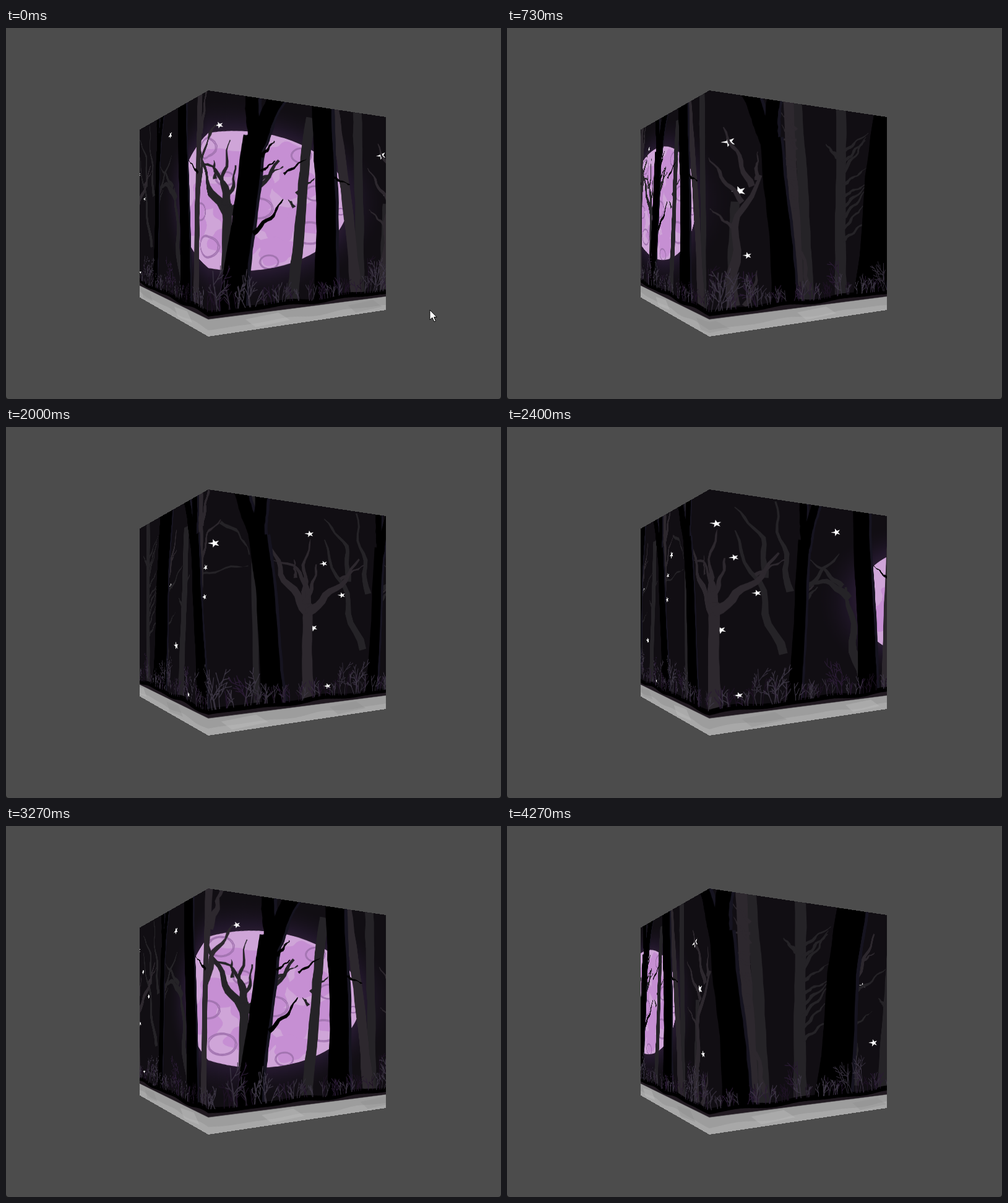
Recreate the animation shown at these times as an HTML page with a canvas. Size 800x600 px, loop 4340 ms.

```html
<!DOCTYPE html>
<html lang="en">
<head>
<meta charset="utf-8">
<title>Night forest cube</title>
<style>
html, body { margin: 0; width: 100%; height: 100%; overflow: hidden; background: #4c4c4c; }
canvas { display: block; }
</style>
</head>
<body>
<canvas id="stage" width="800" height="600"></canvas>
<script>
const LOOP = 4340, STEP = 200 / 3, LAST = 64, TURN = 0.08;
const S = 480, WIDE = 4 * S;              // texture: four square faces side by side
const EDGE_X = 327, EDGE_TOP = 101;
const LEFT = { far: 216, top: 164.5, ratio: 398 / 271, dir: -1 };
const RIGHT = { far: 614, top: 144, ratio: 398 / 312, dir: 1 };

const GREY = '#252327', MAUVE = '#2d282e', RIM = '#161420', BLACK = '#000';
const ORDER = [GREY, MAUVE, RIM, BLACK];
const MOON = { x: 0.208 * S, y: 0.447 * S, rx: 0.535 * S, ry: 0.298 * S };

let seed = 7;
const rand = () => (seed = (seed * 16807) % 2147483647) / 2147483647;
const spread = n => (rand() - 0.5) * n;
const lerp = (a, b, t) => a + (b - a) * t;

// Perspective of one screen column on a face
function column(x, face) {
  const s = (x - EDGE_X) / (face.far - EDGE_X);
  const top = lerp(EDGE_TOP, face.top, s);
  return { u: face.dir * s / (s + (1 - s) * face.ratio), top, h: 600 - 2 * top };
}

// Scenery is placed as it appears on the right face at the current view
let view = 0;
function spot(x, y) {
  const c = column(x, RIGHT);
  return [(view + c.u) * S, (y - c.top) / c.h * S];
}
function outline(points) {
  const path = new Path2D();
  points.forEach(p => path.lineTo(...spot(...p)));
  path.closePath();
  return path;
}

const wood = Object.fromEntries(ORDER.map(c => [c, []]));
const stars = [], craters = [], patches = [];

// Outline of a line whose points are [x, y, width], with rough bark
function limb(color, line) {
  const sideA = [], sideB = [];
  line.forEach(([x, y, w], i) => {
    const p = line[Math.max(0, i - 1)], q = line[Math.min(line.length - 1, i + 1)];
    const dx = q[0] - p[0], dy = q[1] - p[1], d = Math.hypot(dx, dy);
    const a = w / 2 + spread(1.5), b = w / 2 + spread(1.5);
    sideA.push([x - dy / d * a, y + dx / d * a]);
    sideB.unshift([x + dy / d * b, y - dx / d * b]);
  });
  wood[color].push(outline([...sideA, ...sideB]));
}
function dark(line) {
  limb(RIM, line.map(([x, y, w]) => [x + 5, y, w]));
  limb(BLACK, line);
}

// A stem from the upper edge to the ground, flaring at the foot
function stem(head, foot, w, from = 0, to = 1) {
  const line = [], phase = rand() * 6;
  for (let i = 0; i <= 14; i++) {
    const t = i / 14, v = lerp(from, to, t);
    const x = lerp(head, foot, t ** 0.85) + Math.sin(t * 8 + phase) * w * 0.04;
    const c = column(x, RIGHT);
    line.push([x, c.top + c.h * lerp(-0.02, 0.92, v), w * (0.93 + 0.25 * v ** 4)]);
  }
  return line;
}
const pole = (color, ...shape) => limb(color, stem(...shape));

// A black trunk that splits in two; side tells where the slanting arm leans
function forked(x, w, side = -1, lean = 25) {
  dark(stem(x, x - side * lean, w, 0.2));
  dark(stem(x + side * w, x, w * 0.7, 0, 0.26));
  dark(stem(x - side * w * 0.15, x, w * 0.62, 0, 0.26));
}

// A crooked, tapering branch reaching (dx, dy) from its root
function branch(color, x, y, dx, dy, w, bow = 0) {
  const len = Math.hypot(dx, dy), line = [], phase = rand() * 6;
  for (let i = 0; i <= 12; i++) {
    const t = i / 12;
    const off = Math.sin(Math.PI * t) * (bow + Math.sin(t * 12 + phase) * len * 0.035);
    line.push([x + dx * t - dy / len * off, y + dy * t + dx / len * off, w * (1 - 0.8 * t)]);
  }
  limb(color, line);
}

// The tree with a crown of curling arms
function antlers(color, x, y) {
  pole(color, x, x, 16, 0.51);
  const arm = (ox, oy, ...rest) => branch(color, x + ox, y + oy, ...rest);
  arm(0, 12, -62, -112, 16, -4);
  arm(0, 12, 84, -86, 15, 6);
  arm(-4, -4, 9, -103, 9, -5);
  arm(2, -2, -62, -72, 9, 22);
  arm(-6, -2, 20, -64, 8, 5);
  arm(53, -42, 38, -22, 6);
  arm(-19, -44, -2, -30, 6);
}

function star(x, y, r = 7) {
  const pts = [], tilt = spread(0.3);
  for (let i = 0; i < 10; i++) {
    const a = Math.PI + tilt + i * Math.PI / 5;
    const d = i % 2 ? r * 0.38 : r * (i ? 1 : 1.25);
    pts.push([x + Math.cos(a) * d, y + Math.sin(a) * d * 0.8]);
  }
  stars.push(outline(pts));
}
function crater(x, y, r) {
  for (const k of [1, 0.9]) {
    const pts = [];
    for (let a = 0; a < 6.28; a += 0.22)
      pts.push([x + Math.cos(a) * r * k * (1 + spread(0.05)), y + Math.sin(a) * r * k * 0.75]);
    craters.push(outline(pts));
  }
}
function patch(x, y, rx, ry) {
  const path = new Path2D(), phase = rand() * 6;
  for (let a = 0; a < 6.28; a += 0.12) {
    const k = 1 + 0.14 * Math.sin(a * 3 + phase) + 0.07 * Math.sin(a * 7);
    path.lineTo(x + Math.cos(a) * rx * k, y + Math.sin(a) * ry * k);
  }
  patches.push(path);
}

// Moon surface
for (let i = 0; i < 12; i++) {
  const a = i * 2.4, d = Math.sqrt(i / 12) * 0.8;
  patch(MOON.x + Math.cos(a) * d * MOON.rx, MOON.y + Math.sin(a) * d * MOON.ry, 40 + rand() * 28, 26 + rand() * 16);
}
view = -0.08;
crater(347, 195, 22); crater(326, 297, 20); crater(349, 353, 24); crater(450, 377, 15);
crater(434, 292, 22); crater(500, 208, 16); crater(521, 268, 16); crater(513, 331, 24);
crater(425, 186, 16); crater(382, 245, 15); crater(561, 297, 7);

view = 0;                                  // moonlit clearing
star(345, 157);
antlers(GREY, 357, 288);
pole(GREY, 493, 463, 17, 0.08);
branch(GREY, 466, 290, -10, -13, 6);
branch(GREY, 469, 268, 30, -25, 6);
branch(BLACK, 449, 236, 37, -25, 4);
forked(402, 37, 1, 37);
branch(BLACK, 412, 208, 22, -25, 6);
branch(BLACK, 412, 232, 23, -17, 5);
branch(BLACK, 399, 332, 49, -55, 8, 4);
dark(stem(511, 519, 33));
branch(BLACK, 525, 240, 31, 14, 5);
pole(MAUVE, 529, 568, 16);
pole(GREY, 568, 572, 15);
pole(GREY, 613, 609, 10, 0.5);

view = 0.88;                               // open wood with larger lights
star(359, 184, 11); star(376, 264, 11); star(389, 368);
branch(MAUVE, 367, 450, 43, -212, 21, -20);
branch(MAUVE, 380, 282, -56, -73, 10);
branch(MAUVE, 396, 256, -46, -96, 11);
branch(MAUVE, 403, 246, 2, -46, 7);
branch(MAUVE, 364, 322, -36, -30, 6);
branch(MAUVE, 384, 450, 20, -58, 9, 4);
pole(GREY, 468, 488, 17);
pole(MAUVE, 454, 471, 17);
branch(MAUVE, 490, 425, -40, -145, 8);
pole(GREY, 540, 539, 17);
branch(GREY, 535, 210, -20, -22, 8);
for (let i = 0; i < 9; i++) {
  branch(MAUVE, 468, 165 + i * 16, -28 + spread(18), -20 + spread(50), 5);
  branch(GREY, 543, 200 + i * 18, 34 + spread(16), -40 + spread(40), 6);
}

view = 1.12;                               // widest trunk
dark(stem(556, 526, 50));

view = 1.76;                               // starry stretch
star(459, 169); star(394, 251); star(519, 237, 6); star(516, 278, 6); star(418, 359, 9); star(466, 431, 5);
branch(MAUVE, 374, 243, 45, -89, 12, 3);
branch(MAUVE, 380, 222, 12, -48, 7);
branch(MAUVE, 390, 206, 30, -16, 6);
branch(GREY, 372, 268, 72, -47, 8);
branch(GREY, 378, 440, -5, -134, 16);
branch(GREY, 376, 327, 39, -28, 5);
pole(GREY, 460, 437, 21, 0.14);
branch(GREY, 441, 288, -13, -13, 8);
branch(GREY, 446, 262, 24, -22, 8);
pole(MAUVE, 506, 505, 13, 0, 0.55);
branch(MAUVE, 507, 175, 20, -45, 13);
branch(MAUVE, 507, 238, 34, -66, 9, -6);
branch(GREY, 494, 249, 79, -14, 4);
branch(GREY, 540, 176, 34, 44, 5, -8);

view = 2.4;                                // starlit crown
star(337, 188, 9); star(491, 173); star(514, 221, 6); star(543, 272, 6); star(497, 325); star(520, 419, 6);
antlers(MAUVE, 487, 288);
pole(GREY, 398, 405, 9);
branch(GREY, 577, 360, -62, -178, 12);
branch(GREY, 553, 250, -39, -101, 9, 15);
branch(GREY, 585, 270, -19, -130, 10);
branch(MAUVE, 598, 280, 18, -19, 6);

view = 3.36;                               // edge of the moon
star(391, 154, 9); 
forked(325, 25, 1, 20);
branch(GREY, 452, 450, -42, -196, 26, -4);
branch(GREY, 417, 275, -87, -28, 16, 14);
branch(GREY, 404, 252, -69, -50, 10);
branch(GREY, 322, 262, 75, -69, 11);
branch(GREY, 320, 285, 32, -32, 9);
dark(stem(440, 455, 35));
pole(MAUVE, 503, 490, 15);
branch(MAUVE, 505, 184, 17, -58, 12);
branch(MAUVE, 500, 261, 36, -84, 9, -5);
branch(BLACK, 497, 240, -31, -25, 4);

for (const [turn, x, w] of [[0.88, 425, 36], [1.76, 484, 27], [2.4, 408, 32]]) {
  view = turn;
  forked(x, w);
}

// Undergrowth in clumps of upright, twiggy stems
const brush = ['#1e1224', '#2a1b34', '#332d3a', '#3d3745'].map(color => ({ color, path: new Path2D() }));
function sprig(path, x, y, len, angle, level) {
  path.moveTo(x, y);
  for (let i = 1; i <= 3; i++) {
    const bend = angle + spread(0.5);
    x += Math.cos(bend) * len / 3;
    y += Math.sin(bend) * len / 3;
    path.lineTo(x, y);
    if (level && i < 3) {
      sprig(path, x, y, len * 0.45, angle + (rand() < 0.5 ? -0.6 : 0.6) + spread(0.4), level - 1);
      path.moveTo(x, y);
    }
  }
}
for (let i = 0; i < 64; i++) {
  const x = i * WIDE / 64 + spread(22), tall = rand() < 0.25 ? 80 : 42;
  for (let j = 0; j < 4; j++)
    sprig(brush[(i + j * (i % 3)) % 4].path, x + spread(30), S * 0.905, tall * (0.6 + rand() * 0.5),
      -Math.PI / 2 + spread(0.6), tall > 50 ? 2 : 1);
}

function band(g, color, base, swing, end) {
  g.fillStyle = color;
  g.beginPath();
  for (let x = 0; x <= WIDE; x += 8) {
    const a = x / WIDE * 2 * Math.PI;
    g.lineTo(x, S * (base + swing * (Math.sin(a * 9) + Math.sin(a * 14 + 2) * 0.7)));
  }
  g.lineTo(WIDE, S * end); g.lineTo(0, S * end);
  g.fill();
}

function paintFloor(g) {
  band(g, '#9d9d9d', 0.93, 0, 1);
  band(g, '#a8a8a8', 0.972, 0.004, 1);
  for (let i = 0; i < 7; i++) {
    const x = (i + 0.3) * WIDE / 7;
    g.fillStyle = i % 2 ? 'rgba(140,140,140,.35)' : 'rgba(190,190,190,.4)';
    g.beginPath();
    g.moveTo(x, S * 0.95); g.lineTo(x + 80, S * 0.94); g.lineTo(x + 110, S * 0.98); g.lineTo(x + 24, S * 0.99);
    g.fill();
  }
}

function paintMoon(g) {
  g.save();
  g.translate(MOON.x, MOON.y);
  g.scale(MOON.rx, MOON.ry);
  const glow = g.createRadialGradient(0, 0, 0.9, 0, 0, 1.5);
  glow.addColorStop(0, '#302036');
  glow.addColorStop(0.3, '#21172a');
  glow.addColorStop(1, 'rgba(17,14,19,0)');
  g.fillStyle = glow;
  g.beginPath(); g.arc(0, 0, 1.5, 0, 7); g.fill();
  g.restore();
  g.save();
  g.beginPath();
  g.ellipse(MOON.x, MOON.y, MOON.rx, MOON.ry, 0, 0, 7);
  g.fillStyle = '#cfa5d8';
  g.fill();
  g.clip();
  g.fillStyle = '#c68fd3';
  patches.forEach(p => g.fill(p));
  g.strokeStyle = '#a274b0';
  g.lineWidth = 2.2;
  craters.forEach(p => g.stroke(p));
  g.restore();
}

// Repeats a layer on both sides so that it joins around the cube
function wrapped(g, paint) {
  for (const shift of [-WIDE, 0, WIDE]) {
    g.save();
    g.translate(shift, 0);
    paint();
    g.restore();
  }
}

function paintForest() {
  const tile = document.createElement('canvas');
  tile.width = WIDE; tile.height = S;
  const g = tile.getContext('2d');
  const fillAll = (color, paths) => {
    g.fillStyle = color;
    paths.forEach(p => g.fill(p));
  };
  g.fillStyle = '#110e13';
  g.fillRect(0, 0, WIDE, S);
  wrapped(g, () => paintMoon(g));
  wrapped(g, () => fillAll('#fff', stars));
  for (const color of ORDER) wrapped(g, () => fillAll(color, wood[color]));
  band(g, BLACK, 0.892, 0.005, 0.94);
  wrapped(g, () => brush.forEach(b => {
    g.strokeStyle = b.color;
    g.lineWidth = 1.7;
    g.stroke(b.path);
  }));
  band(g, BLACK, 0.9, 0.004, 0.94);
  band(g, '#211a21', 0.916, 0.004, 0.94);
  paintFloor(g);
  return tile;
}

const ctx = document.getElementById('stage').getContext('2d');
const forest = paintForest();

function drawCube(turn) {
  for (let x = LEFT.far; x < RIGHT.far; x++) {
    const face = x < EDGE_X ? LEFT : RIGHT;
    const a = column(x, face).u, b = column(x + 1, face).u;
    const mid = column(x + 0.5, face), w = Math.abs(b - a) * S;
    const sx = (((turn + Math.min(a, b)) % 4 + 4) % 4) * S;
    ctx.drawImage(forest, Math.min(sx, WIDE - w), 0, w, S, x, mid.top, 1, mid.h);
  }
}

const ARROW = new Path2D('M0 0V16L4 12.5 7 19 9.5 18 6.7 11.6H11.2Z');
function drawPointer(k) {
  if (k > 4) return;
  ctx.save();
  ctx.translate(lerp(685, 750, k / 4), lerp(456, 489, k / 4));
  ctx.fillStyle = '#fff';
  ctx.strokeStyle = '#000';
  ctx.fill(ARROW);
  ctx.stroke(ARROW);
  ctx.restore();
}

const CORNERS = new Path2D('M0 595Q0 600 5 600H0ZM800 595Q800 600 795 600H800Z');

const start = performance.now();
function frame() {
  const t = (performance.now() - start) % LOOP;
  const k = Math.min(LAST, Math.floor((Math.floor(t / 10) * 10 + 4) / STEP));
  ctx.fillStyle = '#4c4c4c';
  ctx.fillRect(0, 0, 800, 600);
  ctx.fillStyle = '#1c1c1c';
  ctx.fill(CORNERS);
  drawCube(k * TURN);
  drawPointer(k);
  requestAnimationFrame(frame);
}
frame();
</script>
</body>
</html>
```
